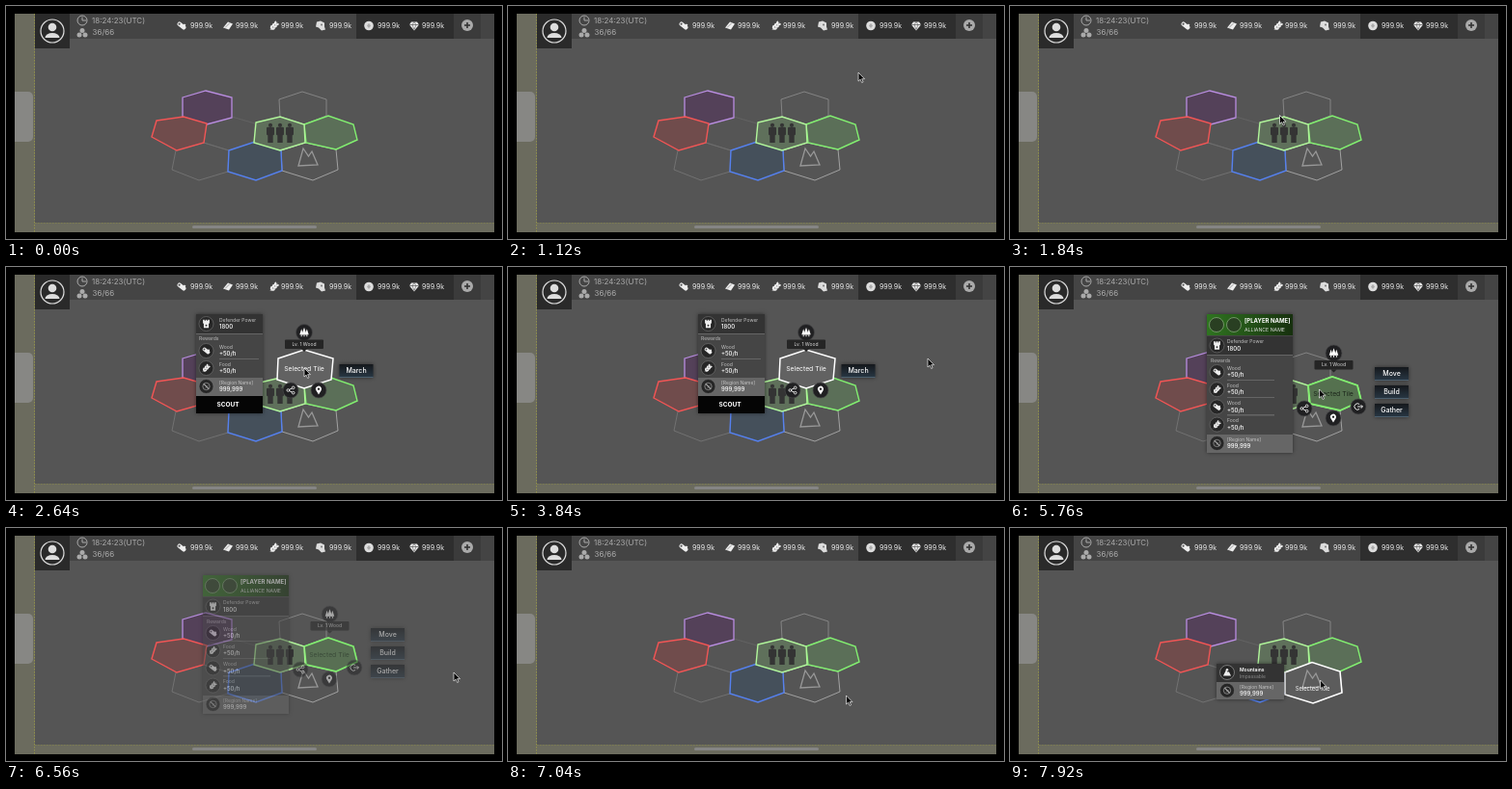
An HTML page with a canvas that plays this animation: 514x242 px, repeating every 8 s.

```html
<!DOCTYPE html>
<html lang="en">
<head>
<meta charset="utf-8">
<title>Tile selection</title>
<style>
html, body { margin: 0; width: 100%; height: 100%; overflow: hidden; background: #000; }
canvas { display: block; width: 100%; height: 100%; }
</style>
</head>
<body>
<canvas id="stage"></canvas>
<script>
const W = 514, H = 242, LOOP = 8000;
const canvas = document.getElementById('stage');
const c = canvas.getContext('2d');
const dpr = window.devicePixelRatio || 1;
canvas.width = W * dpr;
canvas.height = H * dpr;

const clamp = v => Math.max(0, Math.min(1, v));
const ease = v => v * v * (3 - 2 * v);

function rect(x, y, w, h, fill, r = 0) {
  c.fillStyle = fill;
  c.beginPath();
  c.roundRect(x, y, w, h, r);
  c.fill();
}

function poly(pts, fill, stroke, lw = 1, closed = true) {
  c.beginPath();
  for (let i = 0; i < pts.length; i += 2) c.lineTo(pts[i], pts[i + 1]);
  if (closed) c.closePath();
  paint(fill, stroke, lw);
}

function circle(x, y, r, fill, stroke, lw = 1) {
  c.beginPath();
  c.arc(x, y, r, 0, Math.PI * 2);
  paint(fill, stroke, lw);
}

function paint(fill, stroke, lw) {
  if (fill) { c.fillStyle = fill; c.fill(); }
  if (stroke) { c.strokeStyle = stroke; c.lineWidth = lw; c.stroke(); }
}

function text(s, x, y, size, fill = '#fff', weight = 400, align = 'left') {
  c.font = `${weight} ${size}px Inter, sans-serif`;
  c.textAlign = align;
  c.textBaseline = 'middle';
  c.fillStyle = fill;
  c.fillText(s, x, y);
}

function at(x, y, scale, draw) {
  c.save();
  c.translate(x, y);
  c.scale(scale, scale);
  draw();
  c.restore();
}

// Icons are drawn around the origin, about 10 units wide.
const icons = {
  wood() {
    c.rotate(0.65);
    rect(-5, -2.2, 10, 4.4, '#eee', 1.8);
    circle(-3, 0, 1.1, '#555');
    rect(1, -3.4, 2, 2, '#eee', 0.5);
  },
  stone() {
    poly([-5, 2, 0, -4, 5, -2, 1, 4], '#eee');
    poly([-3, 2, 2, -3], null, '#777', 0.7, false);
  },
  food() {
    c.rotate(0.75);
    for (const y of [-3, 0, 3]) {
      c.beginPath();
      c.ellipse(-1.3, y, 1.1, 2, -0.5, 0, 7);
      c.ellipse(1.3, y, 1.1, 2, 0.5, 0, 7);
      paint('#eee');
    }
    poly([0, -5, 0, 6], null, '#eee', 0.7, false);
  },
  ore() {
    poly([-4, -4, 0, -5, 4, -3, 4, 1, 5, 4, 1, 5, -2, 2, -5, 1], '#ddd');
    circle(1, -1, 1, '#777');
  },
  coin() {
    circle(0, 0, 4.8, '#ddd');
    poly([-2, 0, 0, -2.4, 2, 0, 0, 2.4], '#aaa');
  },
  gem() {
    poly([-5, -1, -3, -4, 3, -4, 5, -1, 0, 5], '#eee');
    poly([-5, -1, 5, -1], null, '#555', 0.7, false);
    poly([-2, -1, 0, 4, 2, -1, 0, -4], null, '#555', 0.6);
  },
  tower() {
    poly([-4, -5, -2, -5, -2, -3.5, -1, -3.5, -1, -5, 1, -5, 1, -3.5, 2, -3.5,
      2, -5, 4, -5, 4, -1, 3, 0, 3, 5, -3, 5, -3, 0, -4, -1], '#eee');
    rect(-1, 1, 2, 2, '#333');
  },
  region() {
    circle(0, 0, 4.3, null, '#aaa', 0.8);
    poly([-3, -3, 3, 3], null, '#aaa', 1.4, false);
    poly([-1, 2, 2, -1], null, '#aaa', 0.7, false);
  },
  peak() {
    poly([-4.5, 4, -1, -3, 1, 0, 2, -1, 4.5, 4], '#eee');
    circle(0, -3, 1.4, '#eee');
  },
  trees() {
    for (const [x, s] of [[-3, 0.8], [3, 0.8], [0, 1.1]]) {
      poly([x, -5 * s, x + 2.5 * s, 2.5, x - 2.5 * s, 2.5], '#fff');
      rect(x - 0.5, 2.5, 1, 2, '#fff');
    }
  },
  share() {
    poly([3, -3, -3, 0, 3, 3], null, '#fff', 1, false);
    for (const [x, y] of [[3, -3], [-3, 0], [3, 3]]) circle(x, y, 1.5, '#222', '#fff', 0.9);
  },
  pin() {
    c.beginPath();
    c.arc(0, -1.4, 3.4, 2.6, 0.54);
    c.lineTo(0, 5);
    c.closePath();
    paint('#fff');
    circle(0, -1.4, 1.3, '#222');
  },
  exit() {
    c.beginPath();
    c.arc(-1, 0, 3.6, 0.9, 5.4);
    paint(null, '#fff', 1);
    poly([-1, 0, 5, 0], null, '#fff', 1, false);
    poly([3, -2, 5, 0, 3, 2], null, '#fff', 1, false);
  }
};

const icon = (name, x, y, s = 1) => at(x, y, s, icons[name]);

function badge(name, x, y, r = 8) {
  circle(x, y, r, '#202022', '#48484a', 0.7);
  icon(name, x, y, r / 9);
}

const tiles = {
  left: [176, 150, 205, 142, 231, 150, 230, 172, 200, 181, 172, 170],
  middle: [208, 123, 234, 115, 258, 122, 257, 142, 231, 150, 205, 142],
  top: [283, 97, 307, 89, 332, 97, 332, 114, 309, 123, 284, 115],
  mountain: [285, 150, 310, 142, 342, 149, 344, 170, 318, 181, 286, 171],
  purple: [183, 95, 207, 88, 234, 95, 234, 116, 208, 123, 183, 115],
  red: [156, 119, 184, 115, 208, 122, 205, 142, 177, 150, 151, 136],
  blue: [231, 150, 258, 141, 285, 150, 286, 171, 259, 181, 230, 172],
  ally: [259, 121, 284, 115, 309, 123, 310, 142, 284, 150, 257, 142],
  green: [309, 123, 334, 114, 360, 123, 364, 139, 342, 149, 311, 142]
};

function drawChrome() {
  rect(0, 0, W, H, '#000');
  rect(9, 8, 497, 227, '#555');
  rect(9, 8, 21, 227, '#6b6b5e');
  rect(30, 225, 476, 10, '#6b6b5e');
  c.setLineDash([1.5, 1.5]);
  poly([29.5, 8, 29.5, 235], null, '#92924a', 1, false);
  poly([30, 225.5, 506, 225.5], null, '#7c7c50', 1, false);
  c.setLineDash([]);
  rect(9, 89, 19, 52, '#878784', [0, 5, 5, 0]);
  rect(193, 228, 129, 3, '#858585', 1.5);

  rect(66, 8, 440, 26, '#444');
  rect(363, 8, 101, 26, '#2e2e2e');
  rect(464, 8, 28, 26, '#3b3b3b');
  rect(30, 8, 36, 36, '#2a2a2a');

  circle(48, 26, 12, null, '#ddd', 1.2);
  circle(48, 22, 4.3, '#ddd');
  c.beginPath();
  c.ellipse(48, 33, 7.5, 5, 0, Math.PI, 0);
  paint('#ddd');

  circle(79, 15, 5, null, '#aaa', 1);
  poly([79, 11.5, 79, 15, 83, 15], null, '#aaa', 1, false);
  text('18:24:23(UTC)', 89, 15.3, 8, '#aaa');
  for (const [x, y] of [[79, 25.5], [76, 30], [82, 30]]) circle(x, y, 2.5, '#aaa');
  text('36/66', 89.5, 28, 8, '#aaa');

  const stock = [['wood', 182, 191], ['stone', 230, 238], ['food', 278, 285],
    ['ore', 326, 335], ['coin', 376, 385], ['gem', 423, 431]];
  for (const [name, x, tx] of stock) {
    icon(name, x, 20.5, 1);
    text('999.9k', tx, 21, 7, '#eee');
  }
  circle(478, 20, 6, '#aaa');
  poly([475, 20, 481, 20], null, '#333', 1.6, false);
  poly([478, 17, 478, 23], null, '#333', 1.6, false);
}

function person(x) {
  circle(x, 123.8, 2.1, '#343434');
  rect(x - 4, 125.8, 8, 8.5, '#343434', 1.3);
  rect(x - 2.7, 133, 5.4, 9, '#343434');
}

function drawMountain() {
  poly([303, 166, 308, 148, 313.5, 156, 317, 151, 323, 165], null, '#989898', 1.3);
}

function drawMap() {
  poly(tiles.left, null, '#858585', 0.6);
  poly(tiles.middle, null, '#6c6c6c', 0.6);
  poly(tiles.top, null, '#999', 0.7);
  poly(tiles.mountain, null, '#b5b5b5', 0.8);
  poly(tiles.purple, '#544159', '#b98de0', 1.3);
  poly(tiles.red, '#704c4c', '#f25555', 1.4);
  poly(tiles.blue, '#45505b', '#5580ee', 1.4);
  poly(tiles.green, '#5b6f58', '#82ef70', 1.4);
  poly(tiles.ally, '#5f705b', '#b0f59a', 1.4);
  [274, 284, 294].forEach(person);
  drawMountain();
}

function row(name, x, y, label, value, gap = 14) {
  circle(x, y, 7.5, '#262626', '#777', 0.6);
  icon(name, x, y, 0.85);
  text(label, x + gap, y - 3.7, 5, '#c4c4c4');
  text(value, x + gap, y + 3.4, 6, '#fff', 500);
}

function panel(x, y, w, h, fill) {
  c.save();
  c.shadowColor = 'rgba(0,0,0,.5)';
  c.shadowBlur = 4 * dpr;
  rect(x, y, w, h, fill);
  c.restore();
}

function button(label, x, y) {
  const g = c.createLinearGradient(0, y, 0, y + 14);
  g.addColorStop(0, '#15181c');
  g.addColorStop(1, '#293845');
  panel(x, y, 35, 14, g);
  rect(x, y + 13.4, 35, 0.6, '#708797');
  text(label, x + 17.5, y + 7.2, 7, '#fff', 500, 'center');
}

function levelTag(x, y, r) {
  badge('trees', x, y, r);
  rect(x - 20, y + 7.5, 40, 9.5, '#252525', 1);
  poly([x - 3, y + 17, x + 3, y + 17, x, y + 20], '#252525');
  text('Lv. 1 Wood', x, y + 12.3, 5, '#ddd', 400, 'center');
}

const line = (x, y, w) => rect(x, y, w, 0.6, '#858585');

function scoutView() {
  poly([282, 95, 309, 86, 339, 95, 337, 117, 309, 126, 281, 117], '#626262', '#fff', 1.5);
  text('Selected Tile', 309, 106, 6.8, '#fff', 400, 'center');
  levelTag(309, 68, 8.5);
  badge('share', 295, 128);
  badge('pin', 324, 128);
  button('March', 345.5, 101);

  panel(197, 49, 69, 103, '#454545');
  rect(197, 49, 69, 20, '#333');
  row('tower', 207.5, 59, 'Defender Power', '1800', 13.5);
  line(197, 69, 69);
  text('Rewards', 200, 74, 5, '#bbb');
  row('wood', 207.5, 87, 'Wood', '+50/h', 13.5);
  line(221, 95.5, 41);
  row('food', 207.5, 105, 'Food', '+50/h', 13.5);
  rect(197, 115, 69, 19, '#666');
  row('region', 207.5, 124, '[Region Name]', '999,999', 13.5);
  rect(197, 134, 69, 18, '#050505');
  text('SCOUT', 230, 143, 6.5, '#fff', 700, 'center');
}

function ownerView() {
  poly(tiles.green, '#55714f', '#82ef70', 1.8);
  text('Selected Tile', 335, 132, 6.8, '#1b251a', 400, 'center');
  levelTag(335.5, 89.5, 8.5);
  badge('share', 305, 147);
  badge('pin', 335, 157);
  badge('exit', 361, 145);
  ['Move', 'Build', 'Gather'].forEach((s, i) => button(s, 378, 104 + i * 19));

  panel(204, 49, 89, 144, '#454545');
  const g = c.createLinearGradient(204, 0, 293, 0);
  g.addColorStop(0, '#2f7420');
  g.addColorStop(1, '#17300e');
  rect(204, 49, 89, 22, g);
  for (const x of [214, 232]) circle(x, 60, 7.5, '#293f22', '#82a477', 0.8);
  text('[PLAYER NAME]', 243, 56.5, 6, '#fff', 700);
  text('ALLIANCE NAME', 243, 65, 5.2, '#ddd');
  rect(204, 72, 89, 19, '#333');
  row('tower', 214.5, 81.5, 'Defender Power', '1800', 10.5);
  line(204, 91, 89);
  text('Rewards', 208, 97, 5, '#bbb');
  ['Wood', 'Food', 'Wood', 'Food'].forEach((s, i) => {
    const y = 109 + i * 18.2;
    row(s.toLowerCase(), 214.5, y, s, '+50/h', 10.5);
    if (i < 3) line(225, y + 8.2, 49);
  });
  rect(204, 174, 89, 19, '#666');
  row('region', 214.5, 183, '[Region Name]', '999,999', 10.5);
}

function mountainView() {
  poly([285, 150, 313, 139.5, 342, 149, 344, 171, 314, 182, 285, 173], '#5c5c5c', '#fff', 1.6);
  drawMountain();
  text('Selected Tile', 313.5, 167.5, 5.8, '#fff', 400, 'center');
  panel(214, 141, 70, 37, '#333');
  circle(225, 150, 7.5, '#262626', '#999', 0.7);
  icon('peak', 225, 150, 0.9);
  text('Mountains', 238, 147, 5, '#fff', 600);
  text('Impassable', 238, 154, 5, '#888');
  rect(214, 160, 70, 18, '#666');
  row('region', 225, 168.7, '[Region Name]', '999,999', 13);
}

// Each view dissolves in at "open" and out at "close".
const views = [
  { draw: scoutView, open: 2240, close: 4400 },
  { draw: ownerView, open: 5360, close: 6440 },
  { draw: mountainView, open: 7520, close: 9000 }
];
const FADE = 240;
const layer = document.createElement('canvas');
layer.width = canvas.width;
layer.height = canvas.height;
const layerCtx = layer.getContext('2d');

function drawView({ draw, open, close }, t) {
  const a = ease(clamp((t - open) / FADE)) * (1 - ease(clamp((t - close) / FADE)));
  if (!a) return;
  if (a === 1) return draw();
  // Blend through a copy so overlapping parts fade as one.
  layerCtx.clearRect(0, 0, layer.width, layer.height);
  layerCtx.drawImage(canvas, 0, 0);
  draw();
  c.save();
  c.setTransform(1, 0, 0, 1, 0, 0);
  c.globalAlpha = 1 - a;
  c.drawImage(layer, 0, 0);
  c.restore();
}

// Pointer stops: time, x, y.
const stops = [
  [720, 452, -14], [1440, 300, 128], [1840, 279.5, 113.5], [2120, 309, 105],
  [2640, 309, 105], [3040, 362, 107], [3360, 362, 107], [3840, 435, 95],
  [4160, 474, 100], [4400, 474, 100], [4860, 320.5, 127], [5840, 320.5, 127],
  [6320, 464, 150], [6720, 464, 150], [7040, 350.5, 174], [7360, 321.5, 158],
  [8000, 321.5, 158]
];

function pointerAt(t) {
  if (t < stops[0][0]) return null;
  const i = stops.findIndex(s => s[0] > t);
  const [t0, x0, y0] = stops[i - 1], [t1, x1, y1] = stops[i];
  const k = ease((t - t0) / (t1 - t0));
  return [x0 + (x1 - x0) * k, y0 + (y1 - y0) * k];
}

function arrow() {
  poly([0, 0, 0, 9.5, 2.2, 7.5, 3.8, 11, 5.3, 10.3, 3.8, 7, 6.8, 7], '#000', '#fff', 0.7);
}

function hand() {
  c.lineJoin = 'round';
  poly([-1, 1, 0, 0, 1, 1, 1, 4, 4, 4.8, 5, 6, 4.5, 9, 3.5, 11,
    -1, 11, -3.2, 7.5, -2.8, 6.3, -1, 7.5], '#fff', '#111', 0.8);
}

function drawPointer(t) {
  const p = pointerAt(t);
  if (!p) return;
  const hover = (t > 2040 && t < 2260) || (t > 4780 && t < 5420) || (t > 7260 && t < 7580);
  at(p[0], p[1], 0.95, hover ? hand : arrow);
}

function frame(now) {
  const t = now % LOOP;
  c.setTransform(dpr, 0, 0, dpr, 0, 0);
  drawChrome();
  drawMap();
  views.forEach(v => drawView(v, t));
  drawPointer(t);
  requestAnimationFrame(frame);
}
requestAnimationFrame(frame);
</script>
</body>
</html>
```
